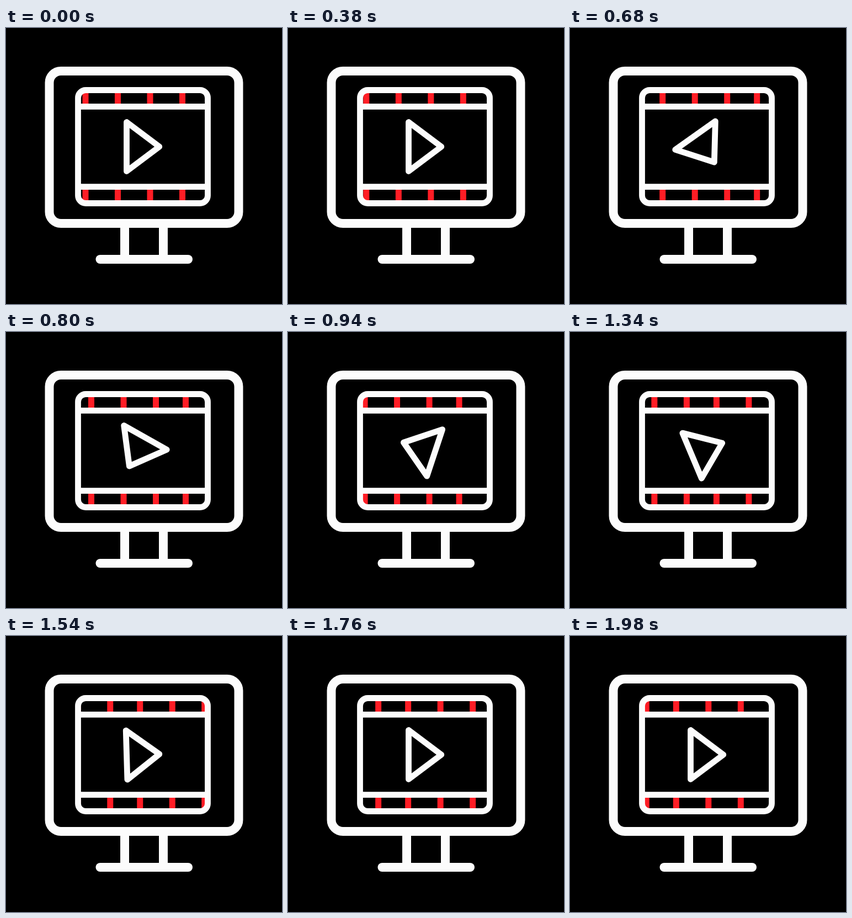
These frames come from a looping animation (500 px wide and 500 px high, 2 s). An HTML page:

```html
<!DOCTYPE html>
<html>
<head>
<meta charset="utf-8">
<style>
  html, body { margin: 0; height: 100%; background: #000; overflow: hidden; }
  svg { display: block; width: 500px; height: 500px; }
</style>
</head>
<body>
<svg viewBox="0 0 500 500" fill="none" stroke="#fcfcfc" stroke-width="10.8" stroke-linejoin="round">
  <clipPath id="film"><rect x="130.5" y="112.5" width="235" height="205" rx="14"/></clipPath>
  <g stroke-width="16">
    <rect x="78.5" y="78" width="343" height="276" rx="21"/>
    <path d="M215 354V416M285 354V416"/>
    <path d="M170.5 419H330" stroke-linecap="round"/>
  </g>
  <g clip-path="url(#film)"><path id="bars" stroke="#ff1d25" stroke-width="11"/></g>
  <rect x="130.5" y="112.5" width="235" height="205" rx="14"/>
  <path d="M130.5 142.3H365.5M130.5 287.6H365.5"/>
  <path id="play" d="M218.5 170.5V259.5L277.8 215Z"/>
</svg>
<script>
const LOOP = 2000, HOLD = 380, STEP = 20;
const bars = document.getElementById('bars');
const play = document.getElementById('play');

// Bars come in groups of four, with a narrower gap between groups
const barX = i => 144 + i * 58.5 - Math.floor(i / 4) * 4.5;

const bezier = (t, a, b) => 3 * a * t * (1 - t) ** 2 + 3 * b * t * t * (1 - t) + t ** 3;

function ease(x) {
  if (x <= 0) return 0;
  if (x >= 1) return 1;
  let low = 0, high = 1;
  for (let i = 0; i < 24; i++) {
    const mid = (low + high) / 2;
    if (bezier(mid, 0.283, 0.409) < x) low = mid; else high = mid;
  }
  return bezier(low, 0, 1);
}

function draw(time) {
  const t = time % LOOP;
  const step = t < HOLD ? 0 : Math.floor((t - HOLD) / STEP) + 1;
  const shift = 2.16 * step + 0.00095 * step * step;
  let d = '';
  for (let i = 0; i < 8; i++) {
    const x = barX(i) - shift;
    d += `M${x} 113V142M${x} 288V317`;
  }
  bars.setAttribute('d', d);
  play.setAttribute('transform', `rotate(${360 * ease((step - 5) / 58)} 242.4 213.1)`);
}

const start = performance.now();
function tick() {
  draw(performance.now() - start);
  requestAnimationFrame(tick);
}
tick();
</script>
</body>
</html>
```
